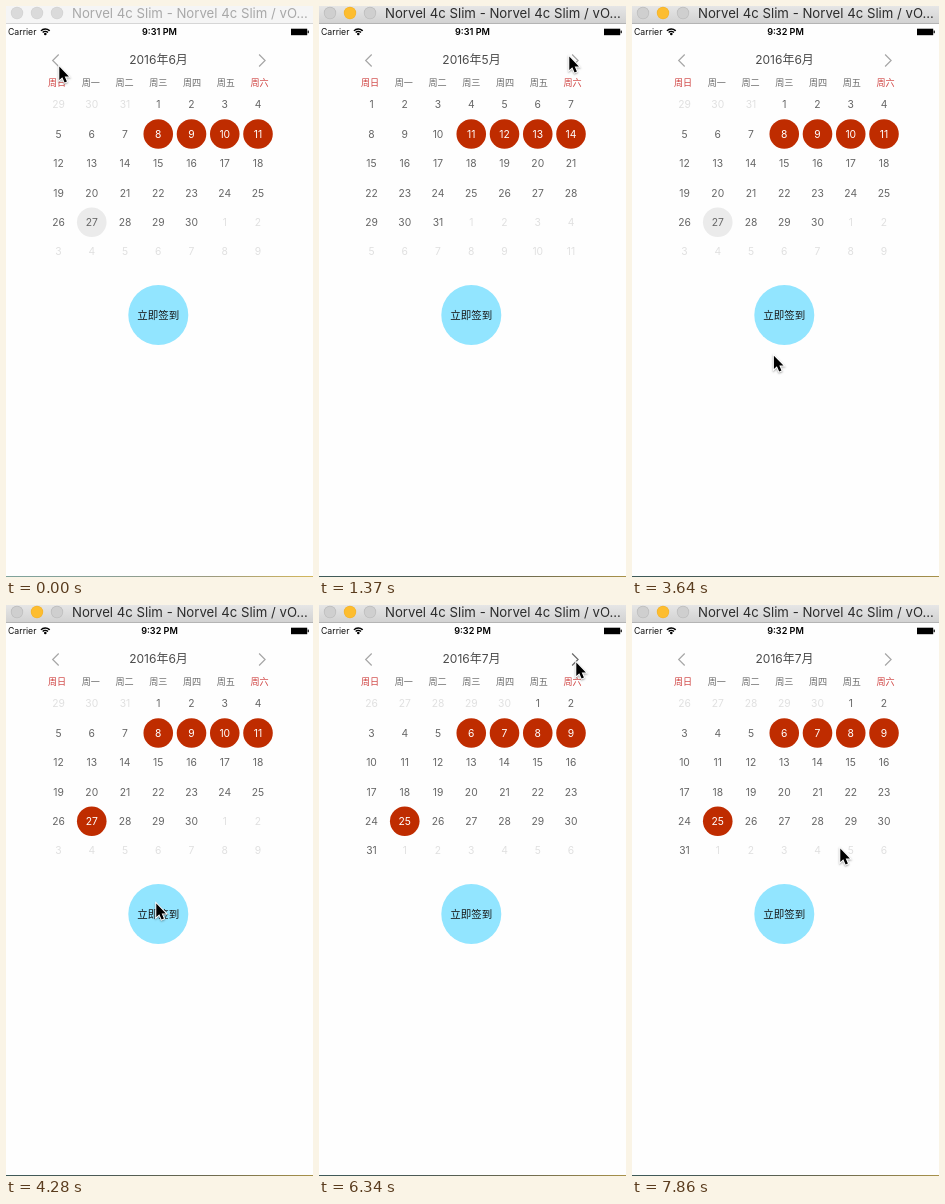
An HTML page with a canvas for the animation above (8 s loop, 307x571 px).

```html
<!DOCTYPE html>
<html lang="zh">
<head>
<meta charset="utf-8">
<title>签到日历</title>
<style>
  html, body { margin: 0; width: 100%; height: 100%; overflow: hidden; background: #fefefe; }
  canvas { display: block; width: 307px; height: 571px; }
</style>
</head>
<body>
<canvas id="stage"></canvas>
<script>
const W = 307, H = 571, LOOP = 8000, TICK = 57;
const canvas = document.getElementById('stage');
const ctx = canvas.getContext('2d');
const ratio = window.devicePixelRatio || 1;
canvas.width = W * ratio;
canvas.height = H * ratio;
ctx.scale(ratio, ratio);

const FONT = 'Inter, "Noto Sans CJK SC", "Noto Sans CJK", sans-serif';
const ACTIVATE = 280, CLOCK = 1600, SIGN = 4280;
const ARROW = new Path2D('M0 0V13.4L3 10.6 5.3 15.8 7.6 14.8 5.4 9.8H9.6Z');

// Each press of an arrow turns one month when released
const PRESSES = [
  { down: 560, up: 670, side: -1 },
  { down: 1540, up: 1650, side: 1 },
  { down: 5320, up: 5380, side: 1 },
  { down: 6340, up: 6570, side: 1 },
  { down: 7330, up: 7450, side: -1 }
];

// The pointer bends towards `via` on its way to `to`
const HOME = [53, 60];
const MOVES = [
  { start: 60, end: 450, via: [52, 57], to: [49, 54] },
  { start: 850, end: 1370, via: [150, 34], to: [250, 50] },
  { start: 2490, end: 3060, via: [72, 272], to: [80, 212] },
  { start: 3300, end: 3930, via: [158, 434], to: [150, 298] },
  { start: 4520, end: 5140, via: [275, -42], to: [257, 57] },
  { start: 6810, end: 6980, via: [150, 60], to: [50, 55] },
  { start: 7680, end: 7860, via: [100, 120], to: [208, 243] }
];

function pointer(t) {
  let from = HOME;
  for (const { start, end, via, to } of MOVES) {
    if (t < start) break;
    const ticks = Math.floor((t - start) / TICK + 0.1) + 1;
    const u = Math.min(1, ticks * TICK / (end - start + TICK)), v = 1 - u;
    from = from.map((p, k) => v * v * p + 2 * u * v * via[k] + u * u * to[k]);
    if (t < end) break;
    from = to;
  }
  return from;
}

function text(str, x, y, size, color, align = 'center', weight = 400) {
  ctx.font = `${weight} ${size}px ${FONT}`;
  ctx.textAlign = align;
  ctx.fillStyle = color;
  ctx.fillText(str, x, y);
}

function disc(x, y, r, color) {
  ctx.fillStyle = color;
  ctx.beginPath();
  ctx.arc(x, y, r, 0, Math.PI * 2);
  ctx.fill();
}

function rect(x, y, w, h, color) {
  ctx.fillStyle = color;
  ctx.fillRect(x, y, w, h);
}

function gradient(x, y, ...colors) {
  const g = ctx.createLinearGradient(0, 0, x, y);
  colors.forEach((c, i) => g.addColorStop(i / (colors.length - 1), c));
  return g;
}

function titleBar(active) {
  rect(0, 0, W, 17, active ? gradient(0, 17, '#e6e6e6', '#d2d2d2') : '#f5f5f5');
  rect(0, 17, W, 1, active ? '#b4b4b4' : '#d6d6d6');
  for (let i = 0; i < 3; i++) {
    const x = 11 + 20 * i, yellow = active && i === 1;
    disc(x, 7, 6.2, yellow ? '#f3b32e' : active ? '#bcbcbc' : '#d2d2d2');
    disc(x, 7, 5.5, yellow ? '#fdbd2f' : active ? '#cfcfcf' : '#dadada');
  }
  text('Norvel 4c Slim - Norvel 4c Slim / vO...', 66, 12, 13.2, active ? '#2c2c2c' : '#a8a8a8', 'left');
}

function statusBar(t) {
  text('Carrier', 2, 29, 8.7, '#111', 'left');
  text(t < CLOCK ? '9:31 PM' : '9:32 PM', 153.5, 29, 9.1, '#000', 'center', 600);
  ctx.strokeStyle = '#000';
  ctx.lineWidth = 1.4;
  for (const r of [3.6, 6]) {
    ctx.beginPath();
    ctx.arc(39.3, 29, r, -Math.PI * 0.76, -Math.PI * 0.24);
    ctx.stroke();
  }
  disc(39.3, 28, 1.3, '#000');
  rect(285, 22.7, 16.2, 6.5, '#000');
  rect(301.6, 24.6, 1.2, 2.6, '#000');
}

function chevron(x, side, pressed) {
  ctx.strokeStyle = pressed ? '#6a6a6a' : '#a6a6a6';
  ctx.lineWidth = 1.2;
  ctx.beginPath();
  ctx.moveTo(x - side * 3, 48.5);
  ctx.lineTo(x + side * 3, 54.5);
  ctx.lineTo(x - side * 3, 60.5);
  ctx.stroke();
}

function calendar(t) {
  const month = PRESSES.reduce((m, p) => t < p.up ? m : m + p.side, 6);
  const press = PRESSES.find(p => t >= p.down && t < p.up);
  for (const side of [-1, 1]) chevron(152.9 + 103.2 * side, side, press && press.side === side);
  text(`2016年${month}月`, 152.5, 58.3, 12, '#4a4a4a');
  [...'日一二三四五六'].forEach((day, i) =>
    text('周' + day, 51 + 33.75 * i, 80, 9.1, i % 6 ? '#6c6c6c' : '#cf4240'));

  const lead = new Date(2016, month - 1, 1).getDay();
  for (let i = 0; i < 42; i++) {
    const date = new Date(2016, month - 1, 1 - lead + i);
    const x = 52.5 + 33.25 * (i % 7), y = 98.6 + 29.4 * Math.floor(i / 7);
    const signed = (i > 9 && i < 14) || (i === 29 && t >= SIGN);
    const today = i === 29 && month === 6;
    if (signed || today) disc(x, y, 14.8, signed ? '#bf2c00' : '#ebebeb');
    const color = signed ? '#fff' : date.getMonth() === month - 1 ? '#666' : '#e0e0e0';
    text(date.getDate(), x, y + 3.7, 10.3, color);
  }
}

function cursor(x, y) {
  ctx.save();
  ctx.translate(x + 0.3, y + 0.6);
  ctx.shadowColor = 'rgba(0,0,0,.35)';
  ctx.shadowBlur = 2 * ratio;
  ctx.shadowOffsetY = ratio;
  ctx.strokeStyle = '#fff';
  ctx.lineWidth = 2;
  ctx.stroke(ARROW);
  ctx.shadowColor = 'transparent';
  ctx.fillStyle = '#000';
  ctx.fill(ARROW);
  ctx.restore();
}

function draw(now) {
  const t = now % LOOP;
  const active = t >= ACTIVATE;
  rect(0, 0, W, H, '#fefefe');
  titleBar(active);
  statusBar(t);
  calendar(t);
  disc(152.3, 309, 30, '#92e5ff');
  text('立即签到', 152.3, 313, 10.5, '#161616');
  rect(0, 570, W, 1, active
    ? gradient(W, 0, '#3f5a58', '#4c5a55', '#6d6a50', '#a8924a')
    : gradient(W, 0, '#7fa39b', '#8a9f96', '#9b9a80', '#d3b75c'));
  cursor(...pointer(t));
  requestAnimationFrame(draw);
}
requestAnimationFrame(draw);
</script>
</body>
</html>
```
